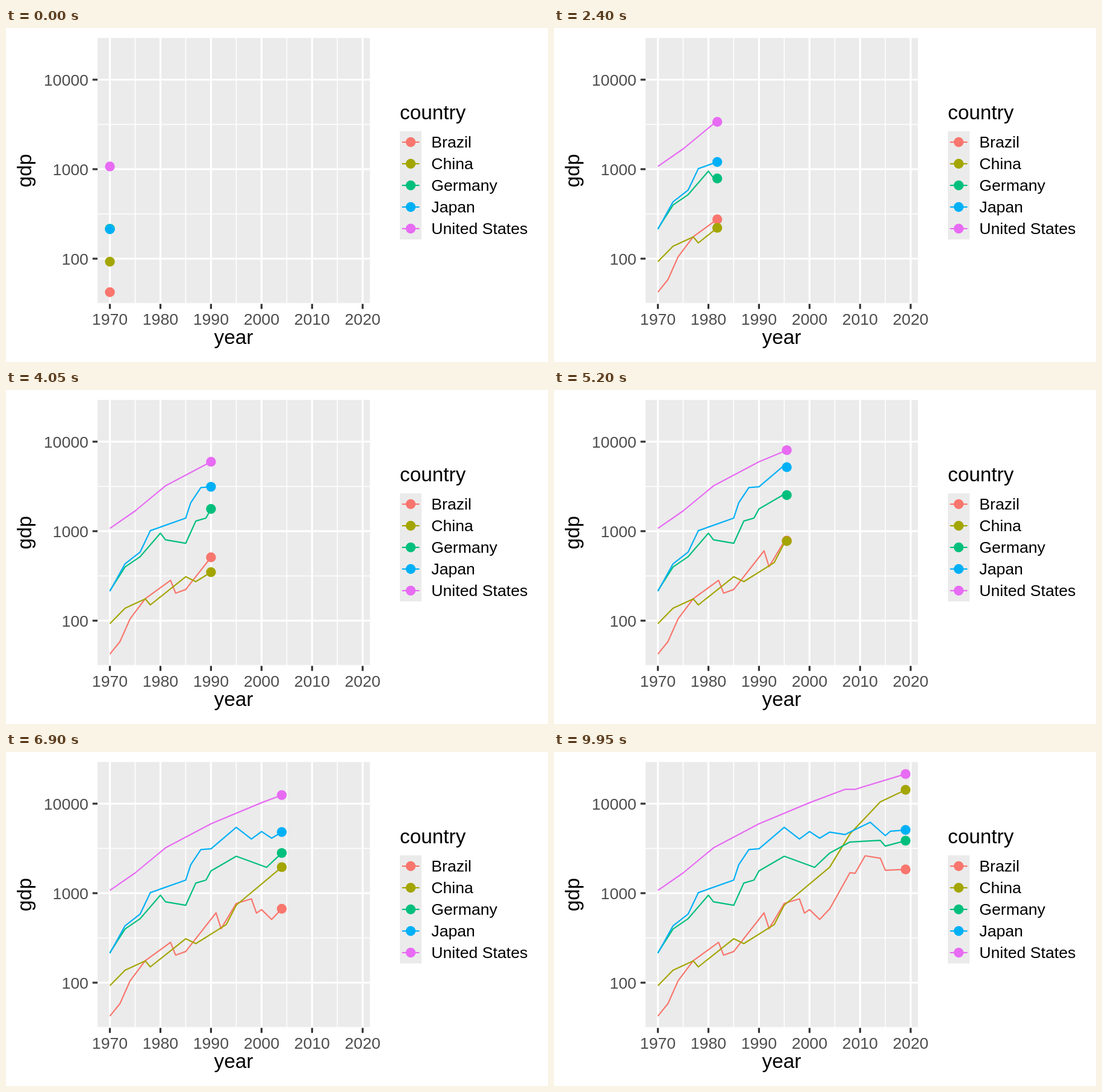
An HTML page for the animation above (10000 ms loop, 900 by 556 pixels).

```html
<!DOCTYPE html>
<html lang="en">
<head>
<meta charset="utf-8">
<title>GDP by country</title>
<style>
  html, body { margin: 0; width: 100%; height: 100%; overflow: hidden; background: #fff; }
  svg { display: block; width: 900px; height: 556px; font: 26.67px "Liberation Sans", Arial, sans-serif; }
  .title { font-size: 33.33px; }
  .axis { fill: #4d4d4d; }
</style>
</head>
<body>
<svg id="chart" viewBox="0 0 900 556"></svg>
<script>
const chart = document.getElementById("chart");
const FIRST_YEAR = 1970, YEARS = 49, FRAMES = 200, FRAME_MS = 50;
const PANEL = { left: 152, top: 16.7, right: 604.3, bottom: 459.3 };

const xOf = year => 172.5 + (year - FIRST_YEAR) * 8.394;
const yOf = gdp => 235 - 149 * Math.log10(gdp / 1000);

function add(tag, attrs, text = "") {
  const node = document.createElementNS("http://www.w3.org/2000/svg", tag);
  for (const name in attrs) node.setAttribute(name, attrs[name]);
  node.textContent = text;
  return chart.appendChild(node);
}
const rect = (x, y, width, height) => add("rect", { x, y, width, height, fill: "#ebebeb" });
const line = (x1, y1, x2, y2, stroke, width) =>
  add("line", { x1, y1, x2, y2, stroke, "stroke-width": width });
const label = (x, y, text, anchor, cls, extra) =>
  add("text", { x, y, "text-anchor": anchor, class: cls, ...extra }, text);
const dot = (cx, cy, fill) => add("circle", { cx, cy, r: 8.2, fill });
const gridX = (year, width) => line(xOf(year), PANEL.top, xOf(year), PANEL.bottom, "#fff", width);
const gridY = (gdp, width) => line(PANEL.left, yOf(gdp), PANEL.right, yOf(gdp), "#fff", width);

// Panel, grid and axes
rect(PANEL.left, PANEL.top, PANEL.right - PANEL.left, PANEL.bottom - PANEL.top);
for (let year = 1975; year < 2020; year += 10) gridX(year, 1.6);
for (let power = 1.5; power < 4; power++) gridY(10 ** power, 1.6);
for (let gdp = 100; gdp <= 10000; gdp *= 10) {
  const y = yOf(gdp);
  gridY(gdp, 3.2);
  line(PANEL.left - 8.3, y, PANEL.left, y, "#333", 3.2);
  label(136.9, y + 9.6, gdp, "end", "axis");
}
for (let year = 1970; year <= 2020; year += 10) {
  const x = xOf(year);
  gridX(year, 3.2);
  line(x, PANEL.bottom, x, PANEL.bottom + 8.3, "#333", 3.2);
  label(x, 494.3, year, "middle", "axis");
}
label(378, 526, "year", "middle", "title");
label(0, 0, "gdp", "middle", "title", { transform: "translate(42 237.5) rotate(-90)" });
label(654, 152, "country", "start", "title");

// Turning points as [years since the first, GDP in billions]; growth is even between them
const series = [];
const country = (name, color, ...turns) =>
  series.push({ name, color, points: turns.map(([age, gdp]) => ({ age, y: yOf(gdp) })) });
country("Brazil", "#f8766d",
  [0, 42.3], [2, 58.5], [4, 105], [7, 176], [12, 282], [13, 203], [15, 223],
  [21, 603], [22, 401], [25, 769], [28, 864], [29, 599], [30, 655], [32, 508],
  [34, 669], [38, 1696], [39, 1667], [41, 2616], [44, 2456], [45, 1802], [49, 1842]);
country("China", "#a3a500",
  [0, 92.6], [3, 138], [7, 175], [8, 150], [15, 310], [17, 273],
  [23, 445], [25, 734], [34, 1955], [38, 4594], [44, 10476], [49, 14280]);
country("Germany", "#00bf7d",
  [0, 216], [3, 398], [6, 520], [10, 950], [11, 800], [15, 732], [17, 1298], [19, 1399],
  [20, 1772], [25, 2586], [31, 1944], [34, 2809], [38, 3730], [44, 3884], [45, 3356], [49, 3861]);
country("Japan", "#00b0f6",
  [0, 213], [3, 432], [6, 586], [8, 1014], [15, 1399], [16, 2079], [18, 3072], [20, 3133], [25, 5449],
  [28, 4033], [30, 4888], [32, 4115], [34, 4815], [37, 4515], [42, 6203], [45, 4389], [46, 4923], [49, 5082]);
country("United States", "#e76bf3",
  [0, 1073], [5, 1685], [11, 3207], [20, 5963], [30, 10252], [37, 14452], [39, 14449], [49, 21433]);

// Legend
rect(654, 172, 36, 180);
series.forEach(({ name, color }, i) => {
  const y = 190 + i * 36;
  line(657.6, y, 686.4, y, color, 2.2);
  dot(672, y, color);
  label(706.3, y + 9.2, name, "start", "");
});

for (const s of series)
  s.path = add("polyline", { fill: "none", stroke: s.color, "stroke-width": 2.2, "stroke-linejoin": "round" });
for (const s of series) s.dot = dot(0, 0, s.color);

// Each year starts on a whole frame; steps inside a year are even
const frameOf = age => Math.round(age * (FRAMES - 1) / YEARS);

function ageAt(frame) {
  let age = 0;
  while (frameOf(age + 1) <= frame) age++;
  return age + (frame - frameOf(age)) / (frameOf(age + 1) - frameOf(age));
}

function draw(now) {
  const age = ageAt(Math.floor(now / FRAME_MS) % FRAMES);
  const x = xOf(FIRST_YEAR + age);
  for (const { points, path, dot } of series) {
    const passed = points.filter(p => p.age <= age);
    const from = passed.at(-1), to = points[passed.length] ?? from;
    const y = from.y + (to.y - from.y) * (age - from.age) / (to.age - from.age || 1);
    const corners = passed.map(p => [xOf(FIRST_YEAR + p.age), p.y]);
    path.setAttribute("points", [...corners, [x, y]].join(" "));
    dot.setAttribute("cx", x);
    dot.setAttribute("cy", y);
  }
}

let start;
function tick(now) {
  start ??= now;
  draw(now - start);
  requestAnimationFrame(tick);
}
draw(0);
requestAnimationFrame(tick);
</script>
</body>
</html>
```
